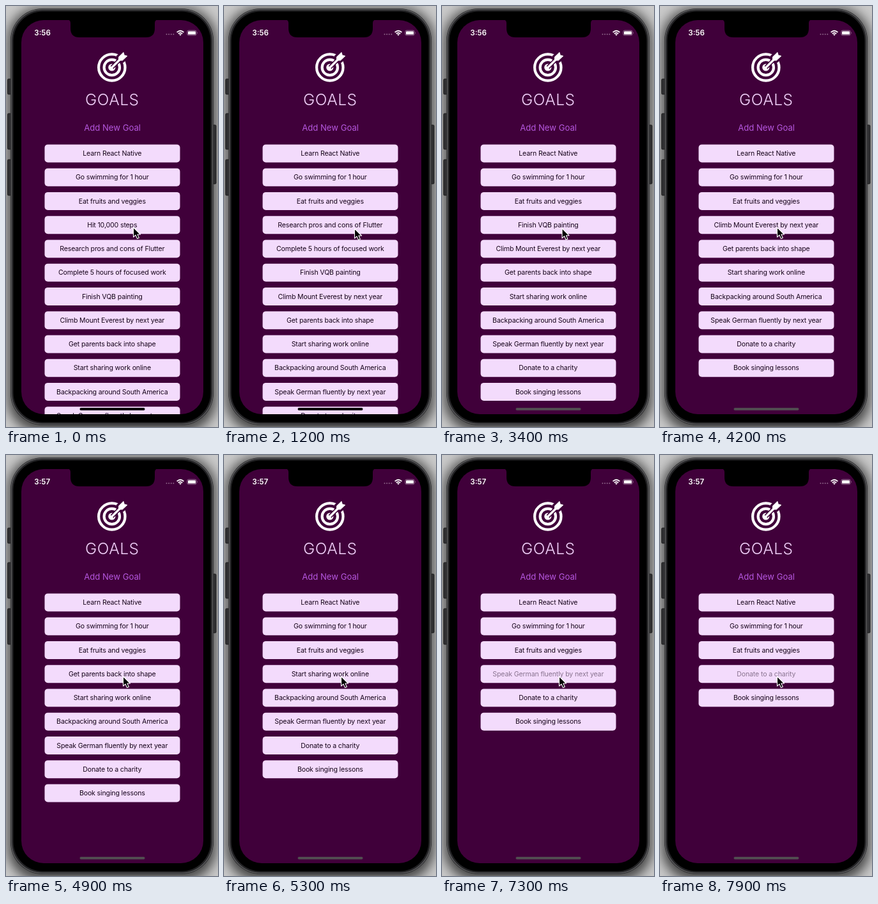
An HTML page for the animation above (8 s loop, 332 by 658 pixels).

```html
<!DOCTYPE html>
<html lang="en">
<head>
<meta charset="utf-8">
<title>Goals</title>
<style>
  html, body { margin: 0; width: 100%; height: 100%; overflow: hidden; background: #c9c9c9; }
  svg { display: block; width: 332px; height: 658px; }
  text { font-family: Inter, Roboto, sans-serif; }
  .mid { text-anchor: middle; }
  .shadow { filter: blur(9px); }
  .item rect { fill: #f3dbfc; }
  .item text { font-size: 10.6px; letter-spacing: -.15px; fill: #17041a; }
  .title { font-size: 24.5px; font-weight: 300; letter-spacing: .5px; fill: #f2d2fb; }
  .add { font-size: 13.1px; fill: #b557de; }
  .time { font-size: 11.6px; font-weight: 600; fill: #fff; }
</style>
</head>
<body>
<svg viewBox="0 0 332 658">
  <defs>
    <clipPath id="screen"><rect x="24" y="22" width="285" height="616" rx="35"/></clipPath>
  </defs>

  <!-- phone body -->
  <rect class="shadow" x="3" y="3" width="326" height="662" rx="50" fill="#000" opacity=".65"/>
  <g fill="#303032" stroke="#151515" stroke-width=".8">
    <rect x="2.5" y="114" width="7" height="24" rx="1.5"/>
    <rect x="2.5" y="168" width="7" height="56" rx="1.5"/>
    <rect x="2.5" y="240" width="7" height="56" rx="1.5"/>
    <rect x="322" y="186" width="7" height="92" rx="1.5"/>
  </g>
  <rect x="7" y="4" width="318" height="651" rx="50" fill="#242426"/>
  <rect x="8.5" y="5.5" width="315" height="648" rx="48.5" fill="none" stroke="#59595b" stroke-width="1.6"/>
  <rect x="11.5" y="8.5" width="309" height="642" rx="46" fill="#000"/>

  <g clip-path="url(#screen)">
    <rect x="24" y="22" width="285" height="616" fill="#40003a"/>
    <g id="list"></g>
    <rect id="home" x="115.5" y="628" width="102" height="4" rx="2"/>
  </g>
  <path d="M97 21.5 Q101 22 101 27 V35 Q101 49 115 49 H219 Q233 49 233 35 V27 Q233 22 237 21.5Z"/>

  <!-- status bar -->
  <text id="clock" class="time" x="44.3" y="46"></text>
  <path d="M251.5 44.3h12" stroke="#8c6488" stroke-width="2" stroke-linecap="round" stroke-dasharray="0 3.6"/>
  <g fill="none" stroke="#fff" stroke-width="1.8">
    <path d="M267.6 41.2 Q273 36.3 278.4 41.2"/>
    <path d="M269.8 43.4 Q273 40.5 276.2 43.4"/>
  </g>
  <path d="M271.2 44.6 Q273 43.1 274.8 44.6 L273 46.6Z" fill="#fff"/>
  <rect x="283.8" y="38.2" width="14.4" height="7.6" rx="2.2" fill="none" stroke="#a584a2" stroke-width=".8"/>
  <rect x="285" y="39.4" width="12" height="5.2" rx="1.2" fill="#fff"/>
  <path d="M299.2 40.6 q1.3 1.4 0 2.8z" fill="#a584a2"/>

  <!-- target icon -->
  <g fill="none" stroke="#fff" stroke-width="4.2">
    <circle cx="165.8" cy="96" r="20.7"/>
    <circle cx="165.8" cy="96" r="12.2"/>
  </g>
  <circle cx="165.8" cy="96" r="5.6" fill="#fff"/>
  <g stroke-linejoin="round">
    <path d="M166 96 L178 84 M176 85.500 V79.500 L184 72.200 L185.200 77 L190 78.200 L182.600 85.500Z" fill="#40003a" stroke="#40003a" stroke-width="6.5"/>
    <path d="M166 96 L180 82" stroke="#fff" stroke-width="3.2" stroke-linecap="round"/>
    <path d="M176.500 85 V79.700 L184 72.500 L185.200 77 L189.700 78.200 L182.400 85Z" fill="#fff" stroke="#fff"/>
  </g>

  <text class="mid title" x="166.300" y="155">GOALS</text>
  <text class="mid add" x="166.600" y="194.700">Add New Goal</text>

  <path id="cursor" d="M0 0 V15.200 L3.500 12 L6 17.600 L8.800 16.400 L6.400 11 H11Z" fill="#000" stroke="#fff" stroke-width="1.100" stroke-linejoin="round"/>
</svg>

<script>
const LOOP = 8000, PITCH = 37.25, TOP = 216.4, FIXED = 3;
const goals = [
  "Learn React Native", "Go swimming for 1 hour", "Eat fruits and veggies",
  "Hit 10,000 steps", "Research pros and cons of Flutter",
  "Complete 5 hours of focused work", "Finish VQB painting",
  "Climb Mount Everest by next year", "Get parents back into shape",
  "Start sharing work online", "Backpacking around South America",
  "Speak German fluently by next year", "Donate to a charity",
  "Book singing lessons"
];
// Times at which the fourth row is tapped away
const taps = [800, 2000, 2900, 3800, 4700, 5200, 6000, 6800, 7400, 8000];
// Pointer stops: time, x, y
const stops = [[0, 199.5, 346], [700, 199.5, 346], [1000, 204.5, 348], [1900, 204.5, 348],
  [2200, 199.5, 352], [2900, 199.5, 352], [3600, 183.5, 346], [LOOP, 183.5, 346]];

const byId = id => document.getElementById(id);
const clamp = v => Math.min(1, Math.max(0, v));

function svg(tag, attrs, parent) {
  const el = document.createElementNS("http://www.w3.org/2000/svg", tag);
  for (const key in attrs) el.setAttribute(key, attrs[key]);
  return parent.appendChild(el);
}

const items = goals.map(goal => {
  const box = svg("g", { class: "item" }, byId("list"));
  svg("rect", { x: 60.5, width: 212, height: 28, rx: 5 }, box);
  const label = svg("text", { class: "mid", x: 166.3, y: 17.8 }, box);
  label.textContent = goal;
  return { box, label };
});

function pointerAt(t) {
  const i = stops.findIndex(s => s[0] > t);
  const [t0, x0, y0] = stops[i - 1], [t1, x1, y1] = stops[i];
  const k = (t - t0) / (t1 - t0);
  return [x0 + (x1 - x0) * k, y0 + (y1 - y0) * k];
}

function draw(t) {
  const gone = taps.filter(tap => tap <= t).length;
  items.forEach(({ box, label }, i) => {
    const removed = i >= FIXED && i < FIXED + gone;
    const row = i < FIXED ? i : i - gone;
    box.setAttribute("display", removed ? "none" : "inline");
    box.setAttribute("transform", `translate(0 ${TOP + row * PITCH})`);
    const press = i === FIXED + gone ? clamp((t - taps[gone] + 200) / 90) : 0;
    label.setAttribute("opacity", 1 - 0.52 * press);
  });
  byId("home").setAttribute("fill", goals.length - gone > 11 ? "#000" : "#514b50");
  byId("clock").textContent = t < 4800 ? "3:56" : "3:57";
  byId("cursor").setAttribute("transform", `translate(${pointerAt(t)})`);
}

function frame() {
  draw(performance.now() % LOOP);
  requestAnimationFrame(frame);
}
draw(0);
requestAnimationFrame(frame);
</script>
</body>
</html>
```
